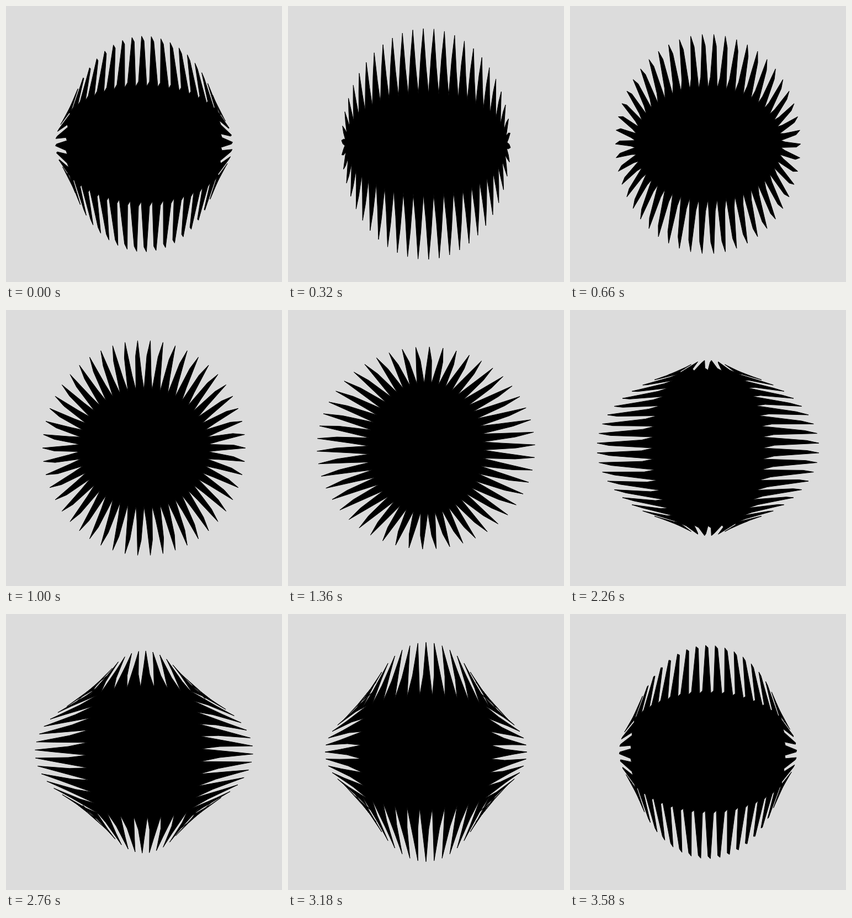
Recreate the animation shown at these times as an HTML page with a canvas. Size 500 px wide and 500 px high, loop 3.6 s.

```html
<!DOCTYPE html>
<html lang="en">
<head>
<meta charset="utf-8">
<title>Spiked ring</title>
<style>
  html, body { margin: 0; width: 100%; height: 100%; overflow: hidden; background: #dcdcdc; }
  canvas { display: block; }
</style>
</head>
<body>
<canvas id="stage" width="500" height="500"></canvas>
<script>
const ctx = document.getElementById('stage').getContext('2d');
const LOOP = 3600, STEP = 20;
const CENTER = 250, RADIUS = 150, DEPTH = 60;
const POINTS = 200, SPIKES = 50;
const RAD = Math.PI / 180;

ctx.lineJoin = 'bevel';
ctx.lineWidth = 1;

function draw(now) {
  // The phase turns one degree per step; half a turn closes the loop.
  const phase = (Math.floor(((now + 0.5) % LOOP) / STEP) - 13) * RAD;
  const depthX = DEPTH * Math.sin(phase);
  const depthY = DEPTH * Math.cos(phase);

  ctx.fillStyle = '#dcdcdc';
  ctx.fillRect(0, 0, 500, 500);

  ctx.beginPath();
  for (let i = 0; i < POINTS; i++) {
    const angle = i / POINTS * 2 * Math.PI;
    const wave = Math.sin(SPIKES * angle + 3 * phase);
    ctx.lineTo(
      CENTER + (RADIUS + depthX * wave) * Math.cos(angle),
      CENTER + (RADIUS + depthY * wave) * Math.sin(angle)
    );
  }
  ctx.closePath();
  ctx.fillStyle = '#000';
  ctx.fill();
  ctx.stroke();
}

function tick() {
  draw(performance.now());
  requestAnimationFrame(tick);
}
tick();
</script>
</body>
</html>
```
